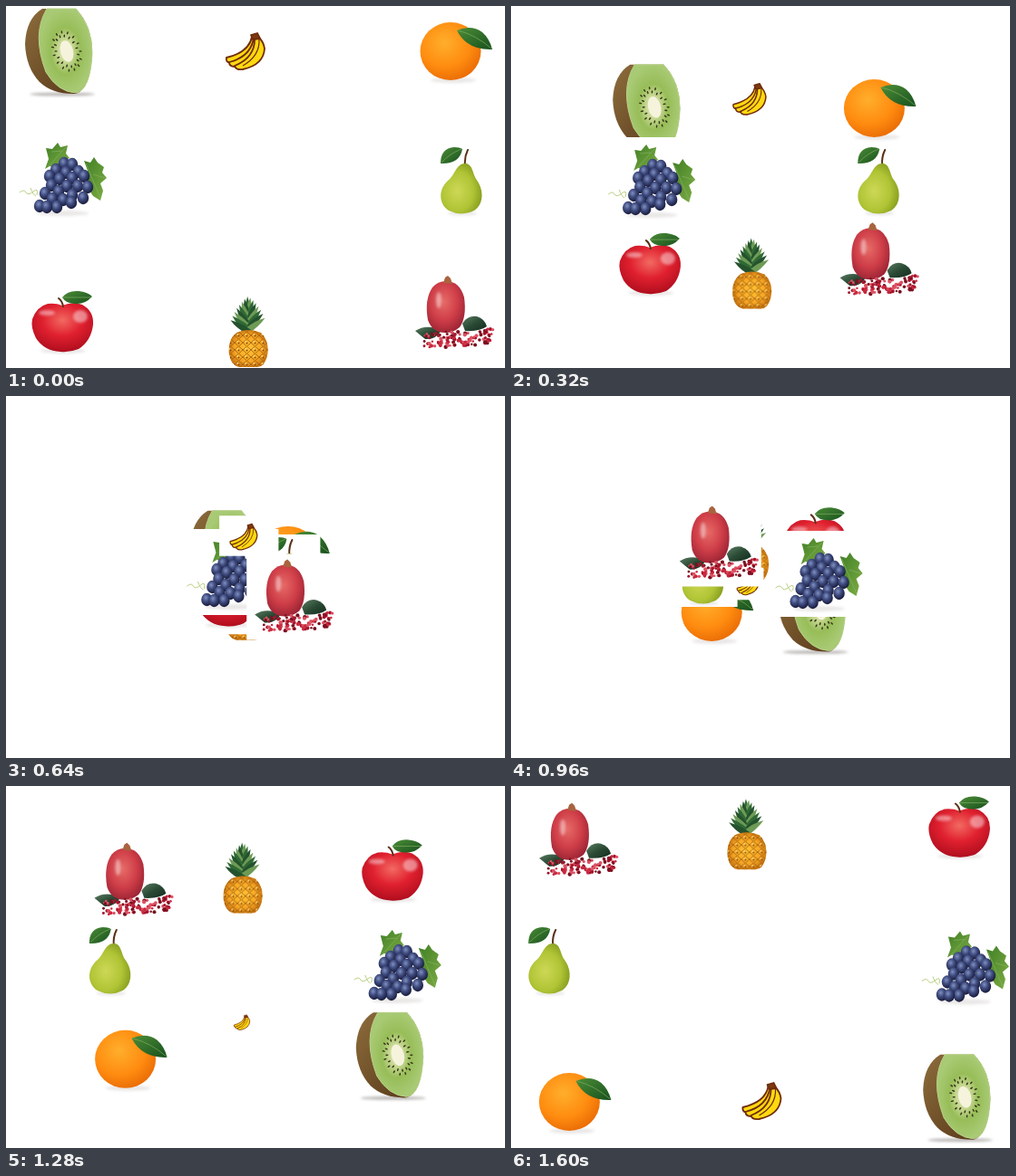
These frames come from a looping animation (550x400 px, 1.68 s). An HTML page:

```html
<!DOCTYPE html>
<html lang="en">
<head>
<meta charset="utf-8">
<title>Fruit crossing</title>
<style>
  html, body { margin: 0; width: 100%; height: 100%; overflow: hidden; background: #fff; }
  svg { display: block; width: 550px; height: 400px; }
  .box { fill: #fff; }
  .shade { fill: #b9b0ae; opacity: .3; filter: url(#soft); }
  .leaf { fill: url(#leaf); }
  .dark { fill: url(#dark); }
  .vein { fill: none; stroke: #8cb56a; stroke-width: .6; }
  .stem { fill: none; stroke: #5a3016; stroke-width: 2; stroke-linecap: round; }
  .glow { fill: #fff; opacity: .45; filter: url(#soft); }
  #banana path:not(.box) { fill: #ffd90f; stroke: #702c0c; stroke-width: 1.8; stroke-linejoin: round; }
</style>
</head>
<body>
<svg viewBox="0 0 550 400">
  <defs>
    <filter id="soft" x="-30%" y="-60%" width="160%" height="220%"><feGaussianBlur stdDeviation="1.8"/></filter>
    <linearGradient id="leaf" x2="1" y2="1"><stop stop-color="#4c8d37"/><stop offset="1" stop-color="#17501d"/></linearGradient>
    <linearGradient id="dark" x2="1" y2="1"><stop stop-color="#5c7d63"/><stop offset=".5" stop-color="#2a4a35"/><stop offset="1" stop-color="#142a1d"/></linearGradient>
    <linearGradient id="vine" x2="1" y2="1"><stop stop-color="#3f7e25"/><stop offset="1" stop-color="#7fae45"/></linearGradient>
    <linearGradient id="skin" x2="1" y2="1"><stop stop-color="#8d6d3c"/><stop offset="1" stop-color="#553517"/></linearGradient>
    <radialGradient id="flesh"><stop offset=".2" stop-color="#d3dfa2"/><stop offset=".55" stop-color="#97bd58"/><stop offset="1" stop-color="#a8ca74"/></radialGradient>
    <radialGradient id="peel" cx=".4" cy=".35" r=".7"><stop stop-color="#ffae2c"/><stop offset=".6" stop-color="#ff8c10"/><stop offset="1" stop-color="#e86a05"/></radialGradient>
    <radialGradient id="berry" cx=".4" cy=".35" r=".65"><stop stop-color="#8090bf"/><stop offset=".45" stop-color="#414e82"/><stop offset="1" stop-color="#171a3a"/></radialGradient>
    <radialGradient id="green" cx=".4" cy=".55" r=".65"><stop stop-color="#cdd856"/><stop offset=".6" stop-color="#b0c435"/><stop offset="1" stop-color="#82991c"/></radialGradient>
    <radialGradient id="red" cx=".5" cy=".35" r=".65"><stop stop-color="#f26a62"/><stop offset=".5" stop-color="#e0202f"/><stop offset="1" stop-color="#b00e1e"/></radialGradient>
    <radialGradient id="rose" cx=".45" cy=".4" r=".65"><stop stop-color="#e66a66"/><stop offset=".55" stop-color="#cf3e48"/><stop offset="1" stop-color="#982233"/></radialGradient>
    <radialGradient id="gold"><stop stop-color="#ffc433"/><stop offset=".7" stop-color="#f5a623"/><stop offset="1" stop-color="#cf7d14"/></radialGradient>
    <pattern id="scales" width="9" height="8" patternUnits="userSpaceOnUse">
      <path d="M0 4L4.5 0L9 4L4.5 8Z" fill="none" stroke="#a8600f" stroke-width=".9"/>
      <circle cx="4.5" cy="4.5" r="1" fill="#85480e"/><circle cx="3.3" cy="2.8" r=".9" fill="#ffe58a"/>
    </pattern>
    <path id="barrel" d="M254 361Q267 355 281 361Q291 371 288 386Q285 399 277 399H257Q248 397 246 385Q244 369 254 361Z"/>
  </defs>

  <g id="kiwi">
    <ellipse cx="62" cy="97.5" rx="36" ry="2" fill="#77716c" opacity=".5" filter="url(#soft)"/>
    <path fill="url(#skin)" d="M40 3H77Q95 22 95 52Q93 92 77 97Q52 98 37 84Q22 68 21 42Q22 14 40 3Z"/>
    <path fill="url(#flesh)" stroke="#b9d18a" d="M45 3H77Q95 22 95 52Q93 93 77 96Q57 95 44 73Q28 31 45 3Z"/>
    <ellipse cx="67" cy="50" rx="7" ry="12" fill="#f6f3dd" transform="rotate(-14 67 50)"/>
  </g>

  <g id="orange">
    <path class="box" d="M443 10h95v86h-95z"/>
    <ellipse class="shade" cx="493" cy="82" rx="25" ry="3"/>
    <ellipse cx="490" cy="50" rx="33.5" ry="32" fill="url(#peel)"/>
    <path class="leaf" d="M497 27Q513 20 525 29Q533 36 536 48Q508 49 497 27Z"/>
    <path class="vein" d="M498 27Q518 32 535 47"/>
  </g>

  <g id="pineapple">
    <path class="box" d="M222 318h93v82h-93z"/>
    <g id="crown"></g>
    <use href="#barrel" fill="url(#gold)"/>
    <use href="#barrel" fill="url(#scales)"/>
  </g>

  <g id="apple">
    <path class="box" d="M18 310h90v81h-90z"/>
    <ellipse class="shade" cx="63" cy="381" rx="25" ry="3"/>
    <path fill="url(#red)" d="M62 331Q74 326 84 330Q97 337 96 352Q94 370 80 379Q70 383 60 382Q42 381 33 367Q27 355 29 346Q34 332 46 329Q55 328 62 331Z"/>
    <ellipse class="glow" cx="82" cy="343" rx="8" ry="7"/>
    <ellipse class="glow" cx="45" cy="339" rx="9" ry="3"/>
    <path class="stem" d="M63 332Q62 326 58 323"/>
    <path class="leaf" d="M62 322Q68 314 80 315Q90 316 95 321Q87 330 76 329Q66 329 62 322Z"/>
    <path class="vein" d="M63 322H94"/>
  </g>

  <g id="pear">
    <path class="box" d="M470 153h70v80h-70z"/>
    <ellipse class="shade" cx="503" cy="229" rx="16" ry="2.5"/>
    <path class="stem" d="M506 176Q505 167 509 159"/>
    <path fill="url(#green)" d="M506 174C514 174 514 184 518 191C527 202 527 219 516 226Q502 233 488 226C476 218 477 202 487 193C495 187 496 174 506 174Z"/>
    <path class="leaf" d="M479 174Q479 157 494 156Q500 156 503 158Q500 175 479 174Z"/>
    <path class="vein" d="M480 173Q489 163 502 158"/>
  </g>

  <g id="grapes">
    <path class="box" d="M14 143h102v95h-102z"/>
    <ellipse class="shade" cx="63" cy="229" rx="28" ry="3"/>
    <path fill="none" stroke="#b9cf83" d="M15 206q5-4 7 0t8-1t4 4M27 201q3 8 6 9"/>
    <path fill="url(#vine)" d="M44 157L51 158L57 151L60 156L68 154L66 163L70 168L61 173L55 179L48 177L43 180L47 169Z"/>
    <path fill="url(#vine)" d="M86 171L93 173L97 167L101 173L108 178L106 184L111 190L104 196L107 204L104 215L96 210L90 201L86 190L90 182Z"/>
    <path class="vein" d="M66 156L47 177M62 160L50 161M88 174L104 212M96 186L109 190"/>
  </g>

  <g id="banana">
    <path class="box" d="M226 17h69v63h-69z"/>
    <path d="M271 34Q268 51 243 57Q242 63 249 63Q270 60 276 38Z"/>
    <path d="M273 35Q270 56 246 62Q246 67 252 67Q274 62 278 38Z"/>
    <path d="M274 35Q275 57 252 66Q253 71 261 70Q284 65 285 47Q284 40 279 35Z"/>
    <path d="M279 37Q280 55 261 66" style="fill:none;stroke-width:1.2"/>
    <path d="M270 32L277 30L280 36L272 37Z" style="fill:#7d3a10"/>
  </g>

  <g id="pomegranate">
    <path class="box" d="M442 292h99v95h-99z"/>
    <path class="dark" d="M451 359Q463 351 480 358Q474 369 462 368Q457 364 451 359Z"/>
    <path class="dark" d="M503 351Q509 341 519 343Q528 346 530 354Q522 360 506 359Z"/>
    <path fill="url(#rose)" d="M485 304Q500 304 505 322Q508 344 500 355Q493 361 484 361Q470 361 465 347Q461 324 470 311Q476 304 485 304Z"/>
    <path fill="#a9643f" d="M482 306L484 300L487 298L490 301L492 307Z"/>
    <ellipse class="glow" cx="477" cy="325" rx="3" ry="9"/>
  </g>
</svg>
<script>
const $ = id => document.getElementById(id);

function add(parent, tag, attrs) {
  const el = document.createElementNS('http://www.w3.org/2000/svg', tag);
  for (const key in attrs) el.setAttribute(key, attrs[key]);
  $(parent).append(el);
}

let seed = 7;
const random = () => (seed = seed * 16807 % 2147483647) / 2147483647;

// Kiwi seeds around the core
for (let i = 0; i < 30; i++) {
  const a = i * Math.PI / 15, r = i % 2 ? 1 : 1.25;
  const x = 67 + 12 * r * Math.cos(a) + 4 * Math.sin(a), y = 50 + 17 * r * Math.sin(a);
  add('kiwi', 'ellipse', { rx: 1.7, ry: .8, fill: '#393519', transform: `translate(${x} ${y}) rotate(${i * 12})` });
}

// Pineapple leaves, from the top down
for (let i = 0; i < 15; i++) {
  const angle = (i % 2 ? 1 : -1) * (2 + i * 4), base = 344 + i * 1.1;
  add('crown', 'path', {
    d: 'M-3 2Q-5 -11 0 -23Q4 -10 3 2Z',
    fill: ['#2f6935', '#6d9a55', '#24522d'][i % 3],
    transform: `translate(267 ${base}) rotate(${angle})`
  });
}

const berries = [64,174, 73,175, 55,181, 80,183, 66,184, 48,188, 59,191, 73,190, 86,188, 50,198, 79,199, 67,199,
  90,200, 58,205, 43,207, 73,209, 85,212, 51,213, 63,214, 37,221, 72,217, 56,222, 45,222];
for (let i = 0; i < berries.length; i += 2)
  add('grapes', 'ellipse', { cx: berries[i], cy: berries[i + 1], rx: 6.2, ry: 7.2, fill: 'url(#berry)' });

for (let i = 0; i < 110; i++) {
  const x = 461 + 76 * random(), top = 360 - Math.max(0, x - 500) * .1;
  add('pomegranate', 'circle', {
    cx: x, cy: top + 17 * random(), r: 1.2 + random(), fill: ['#a3152c', '#c9283e', '#dc5263', '#79101f'][i % 4]
  });
}

// Travel in pixels per step
const travel = {
  kiwi: [22.8, 15.46], orange: [-22.4, 15.74], pineapple: [-.38, -16.15], apple: [22.73, -15.97],
  grapes: [23.05, .5], pear: [-24.2, 0], pomegranate: [-22.1, -14.7]
};

function draw(now) {
  const step = Math.floor(now / 80) % 21, k = Math.min(step, 19);
  for (const id in travel) {
    const [dx, dy] = travel[id];
    $(id).setAttribute('transform', `translate(${dx * k} ${dy * k})`);
  }
  // The banana shrinks on its way, then snaps to full size below
  const [x, y, scale] = step < 20 ? [264 - .25 * k, 50 + 13.2 * k, 1 - .0365 * k] : [276.5, 348, 1];
  $('banana').setAttribute('transform', `translate(${x} ${y}) scale(${scale}) translate(-264 -50)`);
  requestAnimationFrame(draw);
}
requestAnimationFrame(draw);
</script>
</body>
</html>
```
